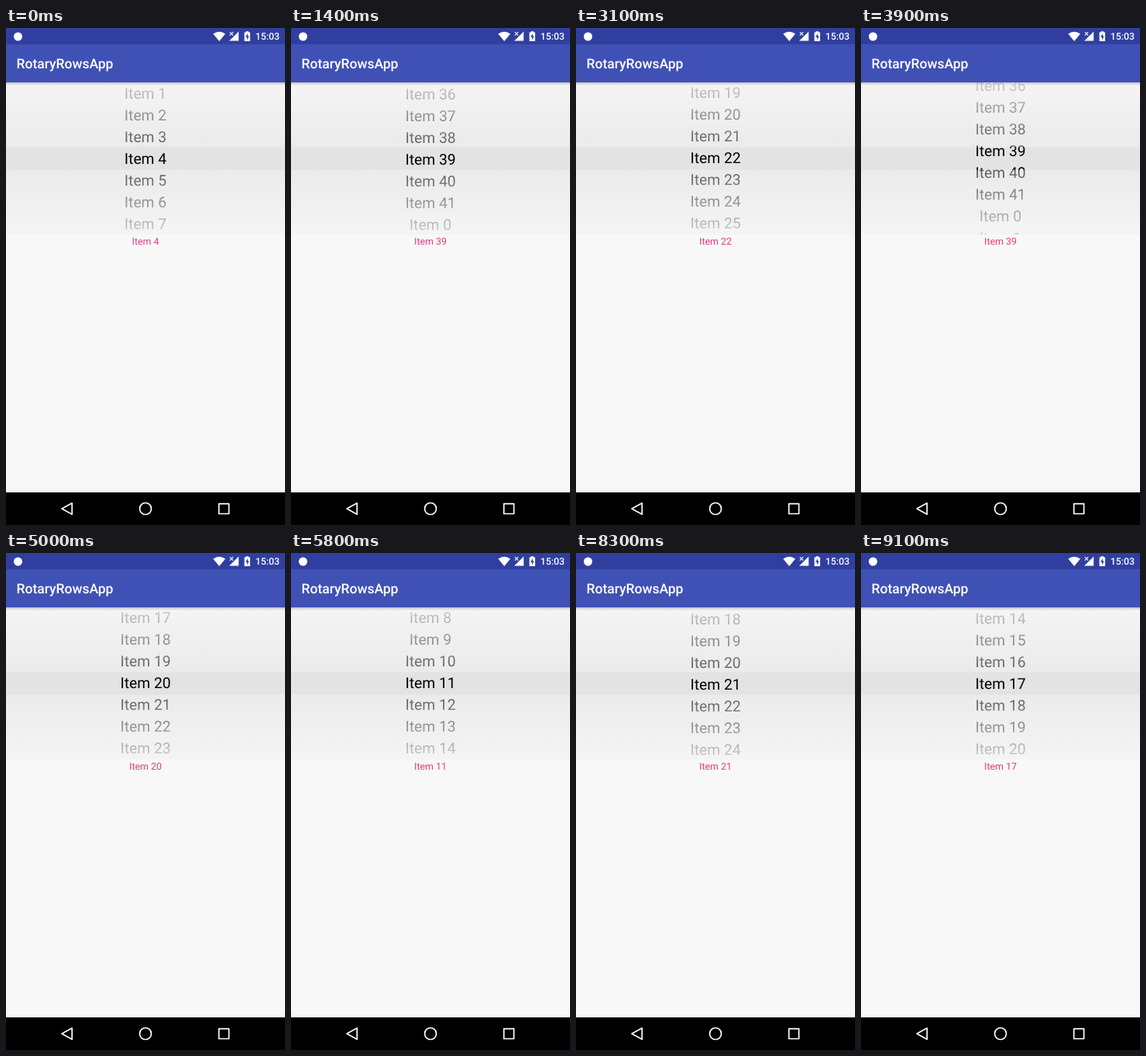
An HTML page that plays this animation: 360x640 px, repeating every 9300 ms.

```html
<!DOCTYPE html>
<html lang="en">
<head>
<meta charset="utf-8">
<title>Wheel picker</title>
<style>
  html, body { margin: 0; width: 100%; height: 100%; overflow: hidden; background: #f8f8f8; }
  svg { display: block; width: 100%; height: 100%; }
  text { font-family: Roboto, "Noto Sans", sans-serif; text-rendering: geometricPrecision; }
  .medium { font-weight: 500; fill: #fff; }
  .mid { text-anchor: middle; }
  .nav { fill: none; stroke: #fff; stroke-width: 1.7; stroke-linejoin: round; }
</style>
</head>
<body>
<svg viewBox="0 0 360 640">
  <defs>
    <linearGradient id="fadeTop" x1="0" y1="0" x2="0" y2="1">
      <stop offset="0" stop-color="#f8f8f8" stop-opacity=".83"/>
      <stop offset="1" stop-color="#f8f8f8" stop-opacity=".37"/>
    </linearGradient>
    <linearGradient id="fadeBottom" x1="0" y1="0" x2="0" y2="1">
      <stop offset="0" stop-color="#f8f8f8" stop-opacity=".37"/>
      <stop offset="1" stop-color="#f8f8f8" stop-opacity=".83"/>
    </linearGradient>
    <linearGradient id="shadow" x1="0" y1="0" x2="0" y2="1">
      <stop offset="0" stop-color="#000" stop-opacity=".2"/>
      <stop offset="1" stop-color="#000" stop-opacity="0"/>
    </linearGradient>
    <clipPath id="window"><rect y="70" width="360" height="196"/></clipPath>
  </defs>

  <rect width="360" height="640" fill="#f8f8f8"/>

  <!-- Picker -->
  <rect y="70" width="360" height="196" fill="#e3e3e3"/>
  <g id="wheel" class="mid" font-size="19.3" clip-path="url(#window)"></g>
  <rect y="70" width="360" height="83.5" fill="url(#fadeTop)"/>
  <rect y="182.5" width="360" height="83.5" fill="url(#fadeBottom)"/>
  <text id="choice" class="mid" x="180" y="279.2" font-size="12.4" fill="#e03d80"></text>

  <!-- App bar -->
  <rect y="70" width="360" height="4" fill="url(#shadow)"/>
  <rect y="21" width="360" height="49" fill="#3f51b5"/>
  <text class="medium" x="13.5" y="52" font-size="17.5">RotaryRowsApp</text>

  <!-- Status bar -->
  <rect width="360" height="21" fill="#303f9f"/>
  <circle cx="15.5" cy="11" r="5.5" fill="#fff"/>
  <path d="M267.3 7.4Q275.2 2 283 7.4L275.2 17Z" fill="#fff"/>
  <path d="M300.2 4.5V16.6H288L294.8 9.9H300.2Z" fill="#fff"/>
  <path d="M294.8 9.9L300.2 4.5V10Z" fill="#fff"/>
  <path d="M288.8 5.2L293.2 9.6M293.2 5.2L288.8 9.6" stroke="#fff" stroke-width="1.1"/>
  <path d="M307.6 5.6H309.6V4.2H313V5.6H315V17H307.6Z" fill="#fff"/>
  <path d="M312 7L309 11.8H311V15.6L313.8 10.6H312Z" fill="#303f9f"/>
  <text class="medium" x="321.8" y="15.2" font-size="12.3">15:03</text>

  <!-- Navigation bar -->
  <rect y="598" width="360" height="42" fill="#000"/>
  <path class="nav" d="M72 619L85.2 611.8V626.2Z"/>
  <circle class="nav" cx="180" cy="619" r="7.5"/>
  <rect class="nav" x="274.7" y="612.6" width="12.9" height="12.9"/>
</svg>
<script>
  const LOOP = 9300, STEP = 100;
  const COUNT = 42, ROW = 28, CENTER = 168, BASELINE = 6.7;

  const speedUp = u => u * u;
  const slowDown = u => 1 - (1 - u) * (1 - u);

  // Drags and flings: start ms, end ms, row from, row to, easing
  const moves = [
    [900, 1300, 4, 0.29, speedUp],
    [1300, 2880, 0.29, -27, slowDown],
    [2880, 4580, -27, 2, slowDown],
    [4700, 6600, 2, 64, slowDown],
    [8200, 9100, 64, 59, slowDown]
  ];

  const wheel = document.getElementById("wheel");
  const choice = document.getElementById("choice");
  const rows = Array.from({ length: 9 }, () => {
    const row = document.createElementNS("http://www.w3.org/2000/svg", "text");
    row.setAttribute("x", 180);
    return wheel.appendChild(row);
  });

  const label = i => "Item " + ((i % COUNT) + COUNT) % COUNT;

  function position(t) {
    let pos = moves[0][2];
    for (const [start, end, from, to, ease] of moves) {
      if (t < start) break;
      pos = from + (to - from) * ease(Math.min(1, (t - start) / (end - start)));
    }
    return pos;
  }

  function draw(ms) {
    const t = Math.floor((ms % LOOP) / STEP) * STEP;
    const pos = position(t);
    const nearest = Math.round(pos);
    rows.forEach((row, k) => {
      const i = nearest + k - 4;
      row.textContent = label(i);
      row.setAttribute("y", (CENTER + BASELINE + (i - pos) * ROW).toFixed(2));
    });
    choice.textContent = label(nearest);
  }

  const begin = performance.now();
  function tick() {
    draw(performance.now() - begin);
    requestAnimationFrame(tick);
  }
  tick();
</script>
</body>
</html>
```
